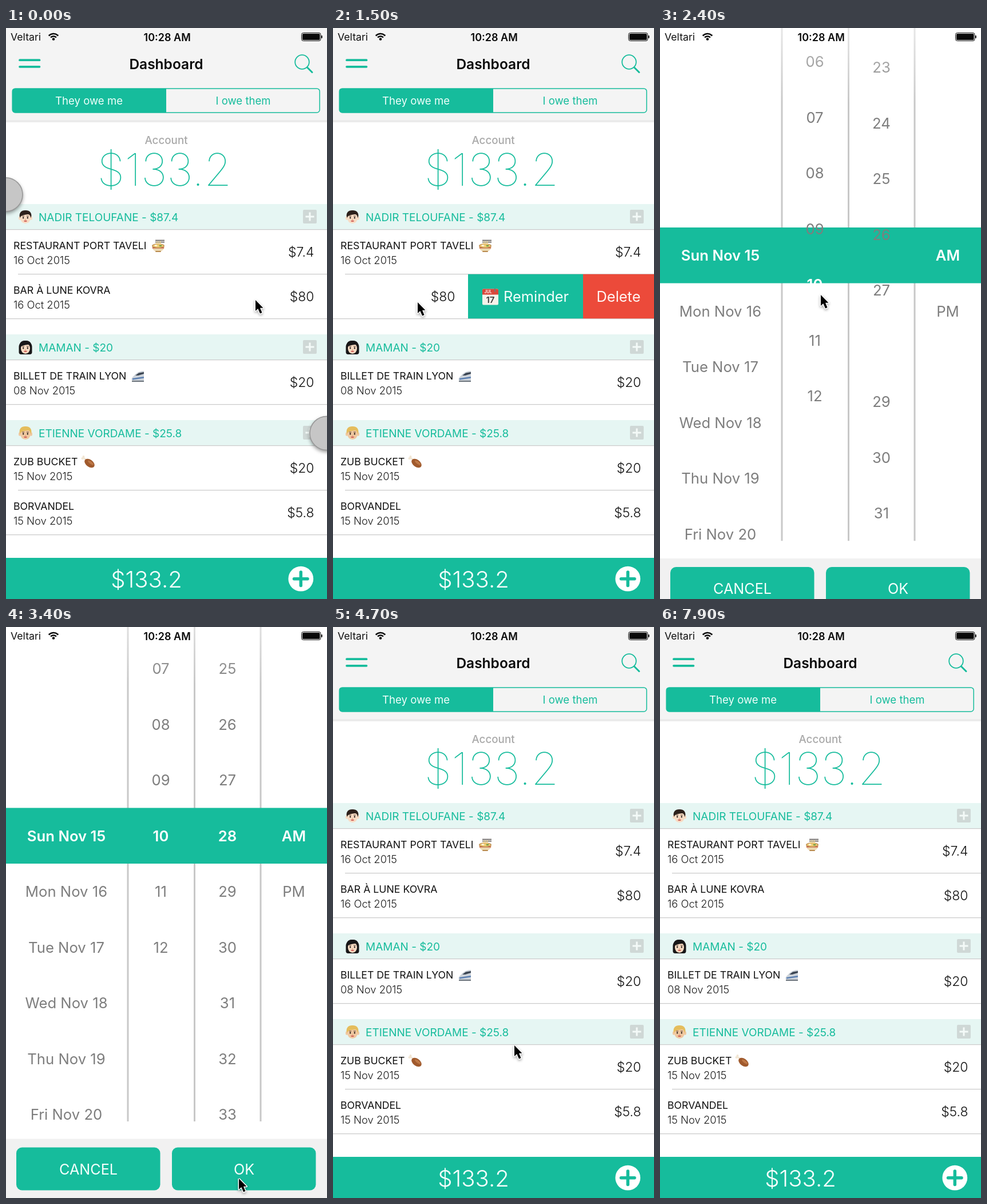
An HTML page with a canvas for the animation above (8000 ms loop, 561x999 px).

```html
<!DOCTYPE html>
<html lang="en">
<head>
<meta charset="utf-8">
<title>Debt dashboard</title>
<style>
html, body { margin: 0; width: 100%; height: 100%; overflow: hidden; background: #fff; }
canvas { display: block; width: 561px; height: 999px; }
</style>
</head>
<body>
<canvas id="stage" width="561" height="999"></canvas>
<script>
const c = document.getElementById('stage').getContext('2d');
const W = 561, H = 999, LOOP = 8000;
const TEAL = '#16bc9c', MINT = '#e6f6f3', LINE = '#cbcbcb';

// ---- helpers ----
const clamp = v => Math.max(0, Math.min(1, v));
const mix = (a, b, p) => a + (b - a) * p;
const span = (t, a, b) => clamp((t - a) / (b - a));
const smooth = p => p * p * (3 - 2 * p);
// critically damped spring, 0 to 1
function spring(t, start, speed) {
  const x = Math.max(0, t - start) / 1000 * speed;
  return 1 - (1 + x) * Math.exp(-x);
}

function rect(x, y, w, h, color, r = 0) {
  c.fillStyle = color;
  c.beginPath();
  c.roundRect(x, y, w, h, r);
  c.fill();
}
function oval(x, y, rx, ry, color, from = 0, to = Math.PI * 2) {
  c.fillStyle = color;
  c.beginPath();
  c.ellipse(x, y, rx, ry, 0, from, to);
  c.fill();
}
function stroke(points, color, width, cap = 'butt') {
  c.strokeStyle = color;
  c.lineWidth = width;
  c.lineCap = cap;
  c.beginPath();
  points.forEach(p => c.lineTo(p[0], p[1]));
  c.stroke();
}
function poly(points, color) {
  c.fillStyle = color;
  c.beginPath();
  points.forEach(p => c.lineTo(p[0], p[1]));
  c.closePath();
  c.fill();
}
// text centred vertically on its capitals
function text(s, x, y, size, color, weight = 400, align = 'left') {
  c.font = `${weight} ${size}px Inter, "Open Sans", sans-serif`;
  c.textAlign = align;
  c.fillStyle = color;
  c.fillText(s, x, y + size * 0.364);
}
function at(x, y, draw) {
  c.save();
  c.translate(x, y);
  draw();
  c.restore();
}
function clipped(x, y, w, h, draw) {
  c.save();
  c.beginPath();
  c.rect(x, y, w, h);
  c.clip();
  draw();
  c.restore();
}

// ---- little pictures, drawn around 0,0 ----
function face(hair, skin, long) {
  if (long) rect(-11.5, -12, 23, 24, hair, [11, 11, 4, 4]);
  else {
    oval(-10, 1.5, 2, 3.2, skin);
    oval(10, 1.5, 2, 3.2, skin);
    oval(0, -3, 10.5, 8.5, hair);
  }
  oval(0, 1.5, long ? 8 : 9, 9.5, skin);
  c.fillStyle = hair;
  c.beginPath();
  c.moveTo(-9.5, 0);
  c.quadraticCurveTo(-12, -12, 0, -12);
  c.quadraticCurveTo(12, -12, 9.5, 0);
  c.quadraticCurveTo(8.5, -5, 4, -5);
  c.quadraticCurveTo(-7, -4, -9.5, 0);
  c.fill();
  for (const x of [-3.8, 3.8]) {
    stroke([[x - 2, -2], [x + 2, -2]], '#5a4232', 1);
    oval(x, 1, 1.2, 1.7, '#332a25');
  }
  oval(0, 3.8, 1.3, 0.8, '#dca780');
  oval(0, 6.8, 2.8, 1.2, '#cf6259');
}
const pics = {
  boy: () => face('#2d211b', '#f8dcc4'),
  girl: () => face('#191718', '#f8dcc4', true),
  blond: () => face('#e5bd5c', '#f0c8a0'),
  noodles() {
    oval(0, 1, 11, 9.5, '#ecd9b0', 0, Math.PI);
    stroke([[-10, 3.5], [10, 3.5]], '#c2553f', 2);
    rect(-5, 9, 10, 2, '#b98a4e', 1);
    oval(0, 0, 11, 4, '#b98a4e');
    oval(0, 0, 9.5, 3, '#eecb72');
    oval(-4, -0.5, 2.6, 1.4, '#fff4e0');
    oval(4, 0, 2.5, 1.3, '#6c9a46');
    stroke([[-5, -9.5], [11, -9.5]], '#3a3430', 1.3);
    stroke([[-5, -6.5], [11, -6.5]], '#3a3430', 1.3);
    for (const x of [-2, 1, 4]) stroke([[x, -8], [x - 1, -1]], '#efd07c', 1.2);
  },
  train() {
    c.fillStyle = '#cdd3da';
    c.beginPath();
    c.moveTo(11, -9);
    c.lineTo(11, 8);
    c.lineTo(-9, 8);
    c.quadraticCurveTo(-13, 5, -7, 0);
    c.quadraticCurveTo(0, -9, 11, -9);
    c.fill();
    poly([[-4, -1], [2, -5.5], [11, -7], [11, -4], [1, -1]], '#3c4653');
    poly([[-9, 4], [11, 1], [11, 3.5], [-9, 6.5]], '#5a7fb2');
    stroke([[-10, 9], [11, 9]], '#59616a', 1.8);
  },
  drumstick() {
    stroke([[-2, -3], [-8, -7]], '#f1e6d4', 3, 'round');
    oval(-9.5, -6, 2, 2, '#f1e6d4');
    oval(-7.5, -9, 2, 2, '#f1e6d4');
    at(3, 2.5, () => {
      c.rotate(0.65);
      oval(0, 0, 10, 6.2, '#a05a2d');
      oval(1, -2, 6, 2.2, '#bd7745');
    });
  },
  calendar() {
    rect(-14, -13, 28, 28, '#f6f2ea', 2);
    rect(-14, -13, 28, 10, '#d9483b', [2, 2, 0, 0]);
    text('JUL', -4, -8, 7, '#fff', 600, 'center');
    text('17', 0, 6, 15, '#3a3a3a', 600, 'center');
    stroke([[8, -14], [8, -8]], '#777', 2);
  },
  clock() {
    oval(0, 0, 11.5, 11.5, '#8c8f91');
    oval(0, 0, 9.5, 9.5, '#f8f6f1');
    stroke([[0, -7], [0, 0], [5, 0]], '#333', 1.6);
  }
};
const pic = (name, x, y) => at(x, y, pics[name]);

// ---- dashboard ----
const groups = [
  { y: 308, who: 'NADIR TELOUFANE - $87.4', icon: 'boy', rows: [
    ['RESTAURANT PORT TAVELI', '16 Oct 2015', '$7.4', 'noodles', 266],
    ['BAR À LUNE KOVRA', '16 Oct 2015', '$80']] },
  { y: 536, who: 'MAMAN - $20', icon: 'girl', rows: [
    ['BILLET DE TRAIN LYON', '08 Nov 2015', '$20', 'train', 230]] },
  { y: 686, who: 'ETIENNE VORDAME - $25.8', icon: 'blond', rows: [
    ['ZUB BUCKET', '15 Nov 2015', '$20', 'drumstick', 143],
    ['BORVANDEL', '15 Nov 2015', '$5.8']] }
];

function topBar() {
  rect(0, 0, W, 161, '#f4f4f4');
  rect(0, 161, W, 4, '#ebebeb');
  for (const y of [56.2, 67.8]) stroke([[24, y], [58.5, y]], TEAL, 3.7, 'round');
  text('Dashboard', 280, 63, 24.5, '#0a0a0a', 600, 'center');
  c.strokeStyle = TEAL;
  c.lineWidth = 1.8;
  c.beginPath();
  c.arc(517.5, 59.5, 12.3, 0, Math.PI * 2);
  c.stroke();
  stroke([[526.5, 69], [535, 77.5]], TEAL, 3, 'round');

  rect(11, 105.9, 269, 42, TEAL, [5, 0, 0, 5]);
  c.strokeStyle = TEAL;
  c.lineWidth = 1.5;
  c.beginPath();
  c.roundRect(11.2, 105.9, 537, 42, 5);
  c.stroke();
  text('They owe me', 145, 127, 18.6, '#f0fffb', 400, 'center');
  text('I owe them', 414.5, 127, 18.6, TEAL, 400, 'center');
}

function rowBody([title, date, price, icon, iconX], y) {
  text(title, 13, y + 28, 17.7, '#111');
  text(date, 13, y + 53, 18.4, '#1c1c1c', 300);
  text(price, 538.5, y + 39, 23, '#111', 300, 'right');
  if (icon) pic(icon, iconX, y + 28);
}

function actions(y, shift) {
  const k = shift / 325, cut = W - 124 * k, left = W - shift;
  clipped(left, y, shift, 78, () => {
    rect(left, y, cut - left, 78, TEAL);
    pic('calendar', left + 39, y + 39);
    text('Reminder', left + 62, y + 39, 25.4, '#f4fffc');
    rect(cut, y, W - cut, 78, '#ec4a3a');
    text('Delete', cut + 62, y + 39, 25.4, '#fff4f2', 400, 'center');
  });
}

function group(g, shift) {
  rect(0, g.y, W, 45, MINT);
  rect(0, g.y + 44, W, 1.3, LINE);
  pic(g.icon, 34, g.y + 23);
  text(g.who, 57, g.y + 23, 19, TEAL);
  rect(519, g.y + 10, 24, 24, '#cfd8d6', 2);
  stroke([[523.5, g.y + 22], [538.5, g.y + 22]], '#f4faf8', 3);
  stroke([[531, g.y + 14.5], [531, g.y + 29.5]], '#f4faf8', 3);
  g.rows.forEach((row, i) => {
    const y = g.y + 45 + i * 78, last = i === g.rows.length - 1;
    const slide = g === groups[0] && i === 1 ? shift : 0;
    at(-slide, 0, () => rowBody(row, y));
    rect(last ? 0 : 21, y + 77, W, 1.2, LINE);
    if (slide) actions(y - 0.5, slide);
  });
}

function dashboard(t) {
  const shift = t < 2700 ? 325 * smooth(span(t, 940, 1400)) : 0;
  rect(0, 0, W, H, '#fff');
  text('Account', 280, 196, 18.8, '#a9a9a9', 500, 'center');
  text('$133.2', 277, 247.5, 78, TEAL, 100, 'center');
  groups.forEach(g => group(g, shift));

  rect(0, 927, W, 72, TEAL);
  text('$133.2', 245.5, 964.5, 40, '#f6fffd', 300, 'center');
  oval(515.3, 963.7, 21.9, 21.9, '#fff');
  stroke([[503.5, 963.7], [527, 963.7]], TEAL, 5.5, 'round');
  stroke([[515.3, 952], [515.3, 975.4]], TEAL, 5.5, 'round');

  const open = smooth(span(t, 5030, 5230)) * (1 - smooth(span(t, 7200, 7450)));
  if (open > 0) clipped(0, 165, W, 60 * open, () => {
    rect(0, 165, W, 60, TEAL);
    pic('clock', 34, 195);
    text('The reminder has been successfully scheduled.', 57, 195, 19, '#f1fffb');
  });
  topBar();
}

// ---- date picker ----
const pad = n => String(n).padStart(2, '0');
const list = (n, f) => Array.from({ length: n }, (_, i) => f(i));
const DAYS = ['Sun', 'Mon', 'Tue', 'Wed', 'Thu', 'Fri', 'Sat'];
const columns = [
  { x: 105.5, items: list(10, i => `${DAYS[i % 7]} Nov ${15 + i}`), pick: 0 },
  { x: 270.5, items: list(12, i => pad(i + 1)), pick: 9 },
  { x: 387, items: list(60, pad), pick: 28 },
  { x: 503, items: ['AM', 'PM'], pick: 0 }
];

function picker(t) {
  const roll = spring(t, 2050, 13), top = -135, mid = 365.5, step = 97.5;
  rect(0, top, W, H - top, '#fff');
  clipped(0, top, W, 1000, () => {
    for (const x of [213, 329.5, 445]) rect(x - 1.5, top, 3, 1000, '#c8c8c8');
    rect(0, 316.5, W, 97.5, TEAL);
    for (const col of columns) {
      col.items.forEach((s, i) => {
        const y = mid + (i - col.pick * roll) * step, on = i === col.pick;
        if (y > top - 20 && y < 890)
          text(s, col.x, y, 25.7, on ? '#fff' : '#7e7e7e', on ? 600 : 400, 'center');
      });
    }
    const fade = c.createLinearGradient(0, top, 0, 100);
    fade.addColorStop(0, '#ffffff');
    fade.addColorStop(1, '#ffffff00');
    rect(0, top, W, 235, fade);
  });
  rect(0, 895.5, W, 104, '#f1f1f1');
  [['CANCEL', 18], ['OK', 290]].forEach(([s, x]) => {
    rect(x, 910.5, 251.5, 75, TEAL, 10);
    text(s, x + 126, 948.5, 25.2, '#f4fffc', 400, 'center');
  });
}

// ---- overlays ----
function statusBar() {
  text('Veltari', 8, 16, 17.7, '#111');
  text('10:28 AM', 281.7, 16, 18, '#0a0a0a', 600, 'center');
  c.strokeStyle = '#0a0a0a';
  c.lineWidth = 2.6;
  c.lineCap = 'butt';
  for (const r of [6.5, 11]) {
    c.beginPath();
    c.arc(83, 21, r, -Math.PI * 0.77, -Math.PI * 0.23);
    c.stroke();
  }
  oval(83, 19.5, 2.3, 2.3, '#0a0a0a');
  c.lineWidth = 1;
  c.beginPath();
  c.roundRect(516.5, 8.5, 33.5, 14, 3);
  c.stroke();
  rect(518, 10, 30.5, 11, '#0a0a0a', 1.5);
  rect(551, 13, 1.8, 5, '#0a0a0a', 1);
}

function touch(x, y) {
  c.save();
  c.shadowColor = 'rgba(0,0,0,.4)';
  c.shadowBlur = 6;
  c.shadowOffsetY = 3;
  oval(x, y, 30, 30, '#c6c6c6');
  c.restore();
  c.strokeStyle = '#989898';
  c.lineWidth = 1.6;
  c.beginPath();
  c.arc(x, y, 29.5, 0, Math.PI * 2);
  c.stroke();
}

// time, x, y
const path = [
  [0, 436, 476], [920, 436, 476], [1400, 148, 480], [1520, 148, 480],
  [1800, 281, 467], [2930, 281, 467], [3200, 407, 965], [3520, 407, 965],
  [4150, 317, 732], [LOOP, 317, 732]
];
function cursor(t) {
  if (t >= 5400) return;
  const i = path.findIndex(k => k[0] > t);
  const [a, b] = [path[i - 1], path[i]];
  const p = smooth(span(t, a[0], b[0]));
  at(mix(a[1], b[1], p), mix(a[2], b[2], p), () => {
    const arrow = [[0, 0], [0, 19], [4.3, 15], [8, 23.5], [11.5, 22], [8, 13.8], [13.5, 13.8]];
    c.shadowColor = 'rgba(0,0,0,.35)';
    c.shadowBlur = 4;
    c.shadowOffsetY = 2;
    c.lineJoin = 'round';
    stroke([...arrow, [0, 0]], '#fff', 3);
    c.shadowColor = 'transparent';
    poly(arrow, '#000');
  });
}

function draw(t) {
  dashboard(t);
  const up = t < 3450 ? spring(t, 2050, 15) : 1 - spring(t, 3450, 13);
  if (up > 0.001) at(0, (1 - up) * (H + 135 * (1 - up)), () => picker(t));
  if (t < 1000) {
    touch(-0.5, 291.5);
    touch(560.5, 709);
  }
  statusBar();
  cursor(t);
}

function tick() {
  draw(performance.now() % LOOP);
  requestAnimationFrame(tick);
}
tick();
</script>
</body>
</html>
```
